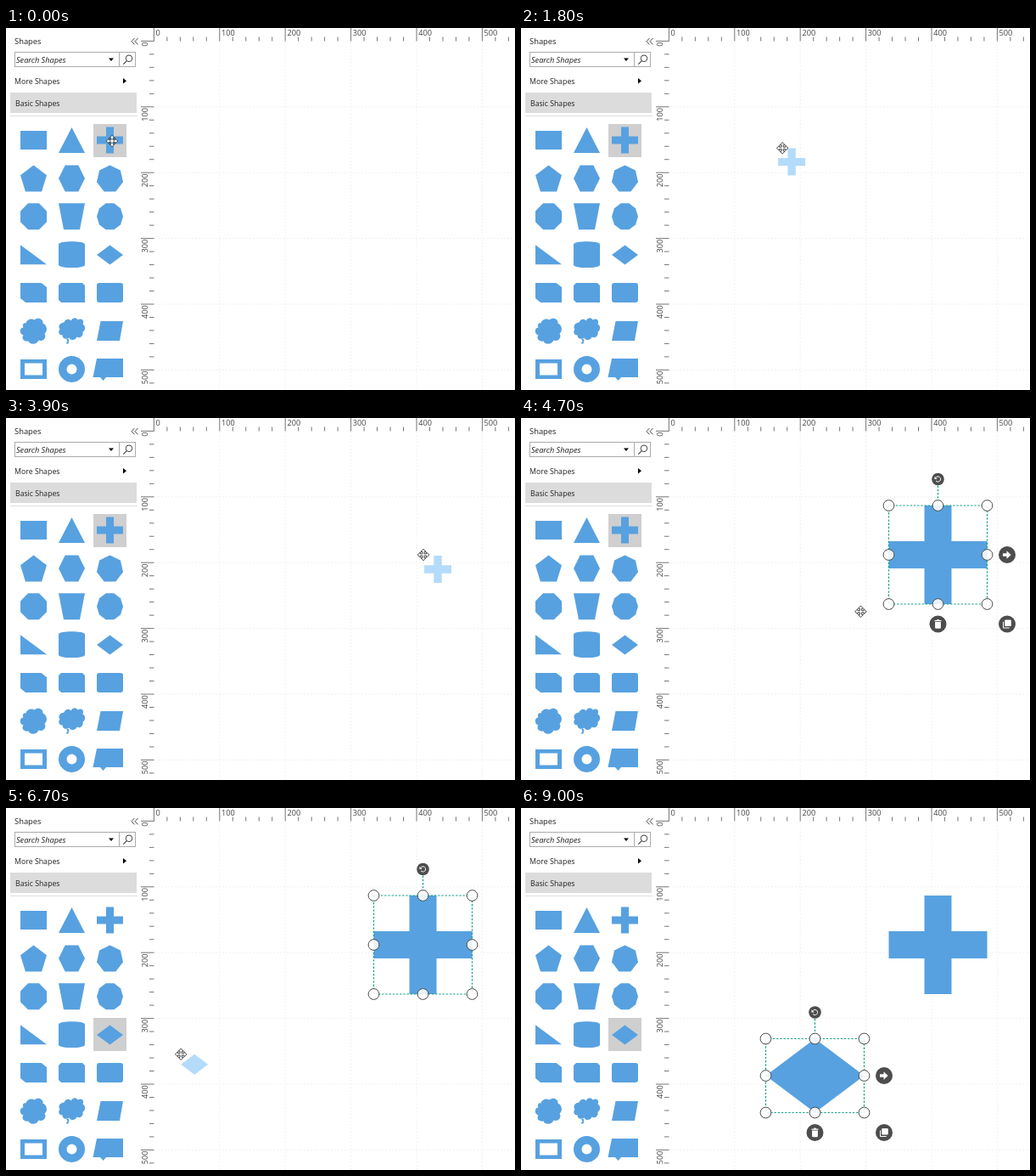
Write an HTML page that moves like this. It is 600 by 426 pixels and loops after 9500 ms.

```html
<!DOCTYPE html>
<html lang="en">
<head>
<meta charset="utf-8">
<title>Drag shapes from a palette</title>
<style>
  html, body { margin: 0; width: 100%; height: 100%; overflow: hidden; background: #fff; }
  svg { display: block; width: 600px; height: 426px; font-family: "Open Sans", "Noto Sans", sans-serif; }
</style>
</head>
<body>
<svg id="stage" viewBox="0 0 600 426" xmlns="http://www.w3.org/2000/svg"></svg>
<script>
const LOOP = 9500, STEP = 100;
const BLUE = '#57a1e0', DARK = '#4d4d4d', TEAL = '#12a187';
const ORIGIN = { x: 174.4, y: 15.4 }, UNIT = 77.4;
const stage = document.getElementById('stage');

// Markup helpers
const attrs = o => Object.entries(o).map(([k, v]) => ` ${k}="${v}"`).join('');
const el = (tag, o, inner = '') => `<${tag}${attrs(o)}>${inner}</${tag}>`;
const path = (d, o = {}) => el('path', { d, ...o });
const rect = (x, y, width, height, o = {}) => el('rect', { x, y, width, height, ...o });
const circle = (cx, cy, r, o = {}) => el('circle', { cx, cy, r, ...o });
const text = (x, y, size, s, o = {}) => el('text', { x, y, 'font-size': size, fill: '#222', ...o }, s);
const at = (x, y, inner) => el('g', { transform: `translate(${x} ${y})` }, inner);

const crossPath = (s, arm) => {
  const a = (s - arm) / 2;
  return `M${a} 0h${arm}v${a}h${a}v${arm}h${-a}v${a}h${-arm}v${-a}h${-a}v${-arm}h${a}z`;
};
const diamondPath = (w, h) => `M0 ${h / 2}L${w / 2} 0L${w} ${h / 2}L${w / 2} ${h}z`;
const polygonPath = (n, turn) => {
  // Regular polygon stretched to fill the 31 px cell
  const pts = Array.from({ length: n }, (_, i) => {
    const a = (i + turn) / n * 2 * Math.PI - Math.PI / 2;
    return [Math.cos(a), Math.sin(a)];
  });
  const fit = k => {
    const v = pts.map(p => p[k]), lo = Math.min(...v), hi = Math.max(...v);
    return v.map(c => ((c - lo) / (hi - lo) * 31 - 15.5).toFixed(2));
  };
  const xs = fit(0), ys = fit(1);
  return 'M' + xs.map((x, i) => `${x} ${ys[i]}`).join('L') + 'z';
};

function grid() {
  let d = '';
  for (let i = 1; i <= 5; i++) {
    d += `M${ORIGIN.x + i * UNIT} 16V426M175 ${ORIGIN.y + i * UNIT}H600`;
  }
  return path(d, { stroke: '#f1f1f1', 'stroke-dasharray': '2 2', fill: 'none' });
}

function rulers() {
  let d = '', labels = '';
  for (let i = 0; i < 28; i++) {
    const major = i % 5 === 0, x = ORIGIN.x + i * UNIT / 5, y = ORIGIN.y + i * UNIT / 5;
    d += `M${x} ${major ? 0 : 10.5}V15.5`;
    d += `M${major ? 159 : 169} ${y}H174.5`;
    if (!major) continue;
    labels += text(x + 2.2, 9, 9.2, i * 20, { fill: '#444' });
    labels += text(0, 0, 9.2, i * 20, {
      fill: '#444', 'text-anchor': 'end', transform: `translate(167 ${y + 1.2}) rotate(-90)`
    });
  }
  return path(d, { stroke: '#666', 'stroke-width': .9, fill: 'none' }) + labels;
}

function panel() {
  const line = { fill: 'none', stroke: '#ababab' };
  return text(10, 19, 9.4, 'Shapes')
    + path('M151.5 12l-3.5 3.7l3.5 3.7M155.5 12l-3.5 3.7l3.5 3.7', { fill: 'none', stroke: '#333', 'stroke-width': .9 })
    + rect(10.5, 28.5, 142, 17, line) + path('M133.5 28.5v17', line)
    + text(12, 41, 9.2, 'Search Shapes', { 'font-style': 'italic' })
    + path('M121 35.5h6l-3 3.5z')
    + circle(145, 35.8, 3.8, { fill: 'none', stroke: '#444' })
    + path('M142.3 38.6l-4 4', { stroke: '#444', 'stroke-width': 1.2 })
    + text(10, 66, 8.8, 'More Shapes')
    + path('M138 59l4 3.2l-4 3.2z')
    + rect(5, 76, 149, 24, { fill: '#dcdcdc' })
    + text(11, 92, 8.7, 'Basic Shapes')
    + path('M5 103.5h150', { stroke: '#dedede' });
}

function paletteShapes() {
  const box = 'M-15.5 -11.5h31v23h-31z';
  const rounded = 'M-12.5 -11.5h25q3 0 3 3v17q0 3 -3 3h-25q-3 0 -3 -3v-17q0 -3 3 -3z';
  const shapes = [
    'M-15.5 -11h31v22h-31z',
    'M0 -15L15.5 15h-31z',
    null,
    polygonPath(5, 0),
    'M-15.5 0L-7.8 -15.5H7.8L15.5 0L7.8 15.5H-7.8z',
    polygonPath(7, 0),
    polygonPath(8, .5),
    'M-15.5 -15.5h31l-6 31h-19z',
    polygonPath(10, .5),
    'M-15.5 -11.5v23h31z',
    'M-15.5 -12C-15.5 -16.5 15.5 -16.5 15.5 -12V12C15.5 16.5 -15.5 16.5 -15.5 12z',
    null,
    'M-15.5 -11.5h24.5l6.5 5v18h-25l-6 -5z',
    'M-12.5 -11.5h25l3 3v20h-28l-3 -3v-17z',
    rounded,
    'M-9 -9C-8 -14 -2 -15 1 -13C5 -17 12 -14 11 -9C16 -7 17 0 13 3C16 8 11 13 6 11C4 16 -4 17 -6 12C-11 13 -15 9 -12 5C-17 4 -17 -4 -12 -4C-14 -8 -11 -10 -9 -9z',
    'M-9 -10C-8 -14 -3 -15 -1 -12C2 -17 6 -15 7 -13C12 -16 15 -12 13 -8C17 -6 16 0 13 1C14 7 9 9 6 7C5 11 -1 12 -3 8C-7 11 -11 9 -11 5C-16 5 -16 0 -14 -2C-17 -6 -13 -10 -9 -10zM-7 8.5l4 1.5l-1 5h-3l2 -3z',
    'M-11 -11.5h26.5l-4 23h-27z',
    box + 'M-10.5 -7v14h21v-14z',
    'M-15.5 0a15.5 15.5 0 1 1 31 0a15.5 15.5 0 1 1 -31 0zM-6 0a6 6 0 1 0 12 0a6 6 0 1 0 -12 0z',
    'M-15.5 -12.5h31v22h-20l-3.5 4l-3.5 -4h-8.5z'
  ];
  const draw = shapes.map((d, i) => d ? at(32.5 + i % 3 * 45, 132 + Math.floor(i / 3) * 44.9,
    path(d, { 'fill-rule': 'evenodd' })) : '').join('');
  return el('g', { fill: BLUE }, draw
    + at(107, 116.5, path(crossPath(31, 9)))
    + at(107, 255.5, path(diamondPath(31, 23))));
}

function selection(x, y, w, h) {
  const cx = w / 2;
  const dash = { fill: 'none', stroke: TEAL, 'stroke-width': 1.2, 'stroke-dasharray': '2.4 1.8' };
  let s = rect(0, 0, w, h, dash) + path(`M${cx} 0V-24`, dash);
  for (const i of [0, 1, 2]) for (const j of [0, 1, 2]) {
    if (i === 1 && j === 1) continue;
    s += circle(i * cx, j * h / 2, 6.4, { fill: '#fff', 'fill-opacity': .87, stroke: DARK });
  }
  s += at(cx, -31, circle(0, 0, 7.3, { fill: DARK })
    + path('M-2.7 -1.6A3.1 3.1 0 1 1 -2.5 1.8', { fill: 'none', stroke: '#fff', 'stroke-width': 1 })
    + path('M-4 -3.3v3.3h3.2z', { fill: '#fff' }));
  return at(x, y, s);
}

function actionIcons(x, y, w, h) {
  const icon = (dx, dy, inner) => at(x + dx, y + dy, circle(0, 0, 10, { fill: DARK }) + el('g', { fill: '#fff' }, inner));
  return icon(w + 23.5, h / 2, path('M-5 -1.7h4.5v-3l5.2 4.7l-5.2 4.7v-3h-4.5z'))
    + icon(w / 2, h + 23.5, path('M-4 -4.6h2.4l.7 -.9h1.8l.7 .9h2.4v1.3h-8zM-3.4 -2.5h6.8v6.6q0 1.2 -1.2 1.2h-4.4q-1.2 0 -1.2 -1.2z'))
    + icon(w + 23.5, h + 23.5, rect(-2.8, -5, 7.6, 7.6, { rx: 1 })
      + path('M-4.5 -2.7v7.2h7.2', { fill: 'none', stroke: '#fff' }));
}

const moveCursor = path('M0 -6.8L3 -3.6H1.1V-1.1H3.6V-3L6.8 0L3.6 3V1.1H1.1V3.6H3L0 6.8L-3 3.6H-1.1V1.1H-3.6V3L-6.8 0L-3.6 -3V-1.1H-1.1V-3.6H-3z',
  { fill: '#fff', stroke: '#333', 'stroke-width': .9 });

const CROSS = [433.5, 103, 116, 116], DIAMOND = [288.5, 271.5, 116, 87];
const ghostStyle = { fill: '#6cb8f5', 'fill-opacity': .5 };
const part = (id, inner) => el('g', { id }, inner);

stage.innerHTML = grid() + rulers() + panel()
  + part('tile', rect(103, 0, 39, 39, { fill: '#cfcfcf' }))
  + paletteShapes()
  + part('cross', at(433.5, 103, path(crossPath(116, 32), { fill: BLUE })))
  + part('crossSelection', selection(...CROSS))
  + part('crossIcons', actionIcons(...CROSS))
  + part('diamond', at(288.5, 271.5, path(diamondPath(116, 87), { fill: BLUE }))
    + selection(...DIAMOND) + actionIcons(...DIAMOND))
  + part('crossGhost', path(crossPath(32, 9.4), ghostStyle))
  + part('diamondGhost', path(diamondPath(32, 24), ghostStyle))
  + part('cursor', moveCursor);

// Waypoints: [ms, x, y]
const cursorPath = [
  [100, 125, 133], [1100, 220, 135], [2100, 346, 144], [2500, 403, 152], [2700, 412, 153],
  [2900, 412, 153], [3900, 492, 161], [4400, 492, 161], [4800, 370, 250], [5200, 190, 346],
  [5400, 120, 317], [5500, 120, 293], [5600, 123, 274], [5800, 123, 274], [6300, 155, 317],
  [6800, 219, 283], [7600, 337, 309], [7800, 341, 312], [8000, 348, 316], [8500, 348, 316],
  [8900, 410, 408], [9000, 425, 445]
];
const crossGhostPath = [
  [200, 109, 109], [1100, 217, 136], [2100, 340, 144], [2500, 393, 151],
  [2700, 421, 153], [2900, 421, 153], [3900, 493, 162]
];

function along(points, t) {
  const next = points.findIndex(p => p[0] > t);
  if (next === 0) return points[0].slice(1);
  if (next < 0) return points[points.length - 1].slice(1);
  const [t0, x0, y0] = points[next - 1], [t1, x1, y1] = points[next];
  const k = (t - t0) / (t1 - t0);
  return [x0 + (x1 - x0) * k, y0 + (y1 - y0) * k];
}

const node = id => document.getElementById(id);
const place = (id, [x, y]) => node(id).setAttribute('transform', `translate(${x} ${y})`);
const show = (id, on) => node(id).setAttribute('visibility', on ? 'visible' : 'hidden');

function render(ms) {
  const t = Math.floor(ms % LOOP / STEP) * STEP;
  const pointer = along(cursorPath, t);
  place('cursor', pointer);
  place('diamondGhost', pointer);
  place('crossGhost', along(crossGhostPath, t));
  place('tile', [0, t < 5900 ? 113 : 247]);
  show('crossGhost', t >= 200 && t < 4200);
  show('cross', t >= 4200);
  show('crossSelection', t >= 4200 && t < 8400);
  show('crossIcons', t >= 4200 && t < 6300);
  show('diamondGhost', t >= 5900 && t < 8400);
  show('diamond', t >= 8400);
  show('cursor', t < 9000);
}

const start = performance.now();
function tick() {
  render(performance.now() - start);
  requestAnimationFrame(tick);
}
tick();
</script>
</body>
</html>
```
